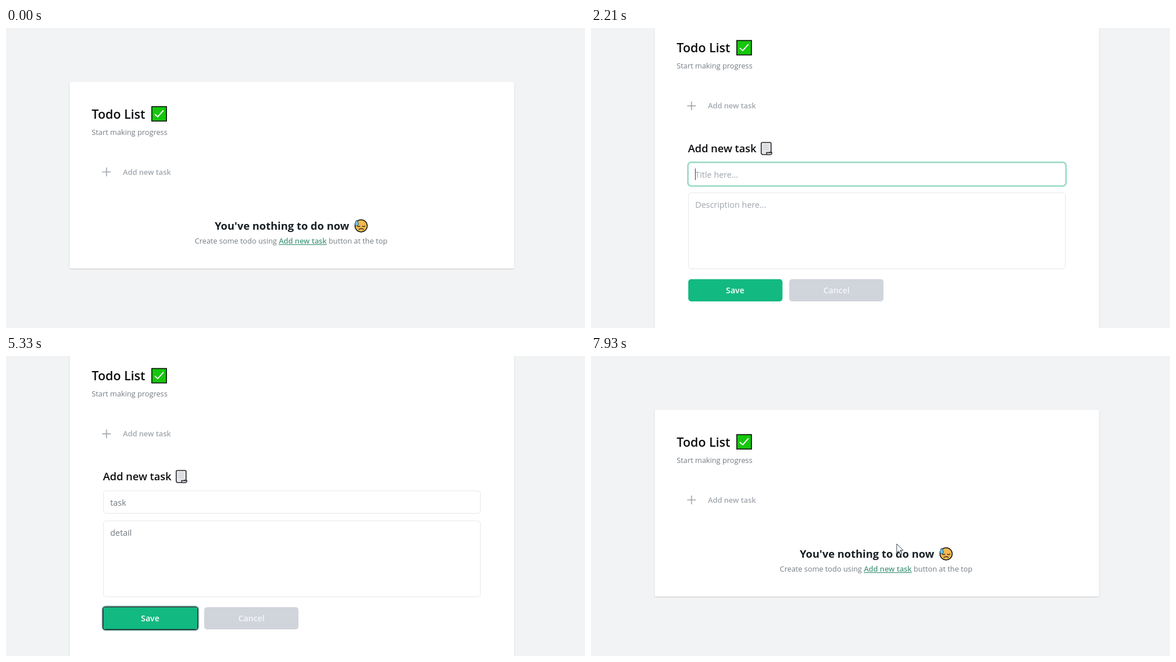
These frames come from a looping animation (1000x519 px, 8 s). An HTML page:

```html
<!DOCTYPE html>
<html lang="en">
<head>
<meta charset="utf-8">
<title>Todo List</title>
<style>
  html, body { margin: 0; width: 100%; height: 100%; overflow: hidden; background: #f1f3f4; }
  svg { display: block; width: 100%; height: 100%; }
  text { font-family: "Open Sans", "Noto Sans", sans-serif; white-space: pre; }
  .title { font-size: 21.5px; font-weight: 600; fill: #0c0d0f; }
  .small { font-size: 12.8px; fill: #767d84; }
  .add { font-size: 12.8px; font-weight: 600; fill: #a0a6ad; }
  .sub { font-size: 18.3px; font-weight: 600; fill: #0c0d0f; }
  .empty { font-size: 18.4px; font-weight: 700; fill: #182024; }
  .link { font-weight: 600; fill: #4c9a80; text-decoration: underline; }
  .body { font-size: 14.4px; fill: #72787e; }
  .hint { fill: #a0a6ad; }
  .btn { font-size: 14.2px; font-weight: 600; fill: #fff; text-anchor: middle; }
  .field { fill: #fff; stroke: #e4e6ea; }
  .ring { fill: none; stroke: #9bdcc4; stroke-width: 2.6; }
  .line { fill: none; stroke-linecap: round; stroke-linejoin: round; }
</style>
</head>
<body>
<svg viewBox="0 0 1000 519" preserveAspectRatio="none">
  <defs>
    <filter id="shadow" x="-5%" y="-5%" width="110%" height="110%">
      <feDropShadow dx="0" dy="1" stdDeviation="1.3" flood-color="#000" flood-opacity=".17"/>
    </filter>
  </defs>

  <rect id="card" x="110" width="767.5" rx="2" fill="#fff" filter="url(#shadow)"/>

  <g id="head">
    <text class="title" x="148" y="156.5">Todo List</text>
    <rect x="251.8" y="136" width="25.4" height="25" fill="#16c60c" stroke="#0b120b" stroke-width="1.6"/>
    <path class="line" d="M257.5 149.5l4.5 4 9.5-10.5" stroke="#fff" stroke-width="1.9"/>
    <text class="small" x="148" y="184.7">Start making progress</text>
    <rect id="hover" x="148.5" y="228" width="690.5" height="42" rx="5" fill="#f0f2f4"/>
    <path class="line" d="M166.8 249h13.6M173.6 242.2v13.6" stroke="#a0a6ad" stroke-width="1.7"/>
    <text class="add" x="202" y="253.5">Add new task</text>
  </g>

  <g id="empty">
    <text class="empty" x="360.5" y="349">You've nothing to do now</text>
    <circle cx="613.3" cy="342.3" r="10.6" fill="#f2b950" stroke="#17191b" stroke-width="1.5"/>
    <path class="line" d="M606.8 342.5q2 2 4.3.4M615.6 342.9q2.3 1.6 4.3-.4M609.5 348.5q4-3 8 0" stroke="#2a2419" stroke-width="1.4"/>
    <path d="M605.4 332.2q5.4 7 2.3 9.5-2.6 1.5-4.6-.8-1.4-2.4 2.3-8.7z" fill="#6cc3ee" stroke="#22465a" stroke-width=".9"/>
    <text class="small" x="326" y="373">Create some todo using <tspan class="link">Add new task</tspan> button at the top</text>
  </g>

  <g id="form">
    <text class="sub" x="167.5" y="215">Add new task</text>
    <path d="M296 198h13.5q1.5 0 1.5 2v15h-3v4h-11q-3 0-3-3v-16q0-2 2-2z" fill="#e6e7e9" stroke="#26282b" stroke-width="1.6" stroke-linejoin="round"/>
    <path d="M303 215.5h9.5q0 3.8-3.2 3.8h-5q-1.3-1-1.3-3.8z" fill="#c9ccd0" stroke="#26282b" stroke-width="1.3"/>
    <path d="M297.5 203h9.5M297.5 206.5h9.5M297.5 210h9.5" stroke="#c2c5c9"/>
    <rect class="field" x="168.3" y="233.3" width="651" height="39" rx="5"/>
    <rect id="ringTitle" class="ring" x="167.3" y="232.2" width="653.2" height="41.3" rx="6"/>
    <text id="title" class="body" x="180" y="258.6"></text>
    <rect class="field" x="168.3" y="285" width="651" height="131.6" rx="5"/>
    <rect id="ringDetail" class="ring" x="167.3" y="283.8" width="653.2" height="133.8" rx="6"/>
    <text id="detail" class="body" x="180" y="310.6"></text>
    <path id="caret" d="M0 0v20" stroke="#4b5056" stroke-width="1.2"/>
    <rect x="168" y="434.5" width="162.7" height="38.5" rx="5" fill="#12b981"/>
    <g id="ringSave" fill="none">
      <rect x="165.8" y="432.3" width="167.2" height="42.8" rx="6" stroke="#b9dde0" stroke-width="2"/>
      <rect x="167.4" y="434" width="163.9" height="39.4" rx="4.5" stroke="#14241f" stroke-width="1.7"/>
    </g>
    <text class="btn" x="249" y="459">Save</text>
    <rect x="342.3" y="434.5" width="162.9" height="38.5" rx="5" fill="#d0d4db"/>
    <text class="btn" x="424" y="459" style="fill:#f5f6f8">Cancel</text>
  </g>

  <g id="list">
    <text class="body" x="148.5" y="328.6">1.</text>
    <text class="body" x="168" y="328.6">task</text>
    <path class="line" d="M789 321.8l3.6 3.5 7.6-7.6" stroke="#36b493" stroke-width="2.5"/>
    <g class="line" stroke="#cf5144" stroke-width="1.7">
      <path d="M822.8 317h12.6M826.3 316.5v-2.7h5.6v2.7M824.2 317.5l.6 10.6h8.6l.6-10.6"/>
      <path d="M827.5 320.5v4.5M830.7 320.5v4.5" stroke-width="1.5"/>
    </g>
  </g>

  <path id="arrow" d="M0 0v15.5l3.6-3.4 2.6 5.8 2.6-1.2-2.6-5.5h4.9z" fill="#fff" stroke="#3a4148" stroke-linejoin="round"/>
  <path id="hand" d="M-1.7 1.5Q0-1 1.6 1.5V7q1.5-1.1 2.9.3 1.6-.9 2.8.6 2.2-.7 2.7 1.5v4.4q-.4 3.4-2.2 5.4v1.7H-.2v-1.6Q-3 16-5.2 12.5q-.7-2.4 1.2-2.3l2.3 2z" fill="#fff" stroke="#3a4148" stroke-linejoin="round"/>
</svg>
<script>
const LOOP = 8000, STEP = 130;
const OPEN = 1300, SAVED = 5720, REMOVED = 7540;
const ui = Object.fromEntries([...document.querySelectorAll('[id]')].map(el => [el.id, el]));

// Tracks are [time, value...] rows in order of time.
const hover = [[390, 0], [780, 1], [1300, 1], [1560, 0]];
const formFade = [[1300, .05], [1560, 1], [5330, 1], [5720, 0]];
const listFade = [[5720, .15], [5980, 1]];
const pointer = [[6240, 560, 500], [6500, 752, 396], [6760, 818, 329], [7020, 826, 318],
                 [7150, 827, 317], [7540, 827, 317], [7670, 827, 317], [7800, 690, 320], [7930, 528, 325]];
const focus = [[0, ''], [2210, 'title'], [2990, 'detail'], [5200, 'save']];
const titleText = [[0, ''], [2470, 't'], [2600, 'ta'], [2730, 'tas'], [2860, 'task']];
const detailText = [[0, ''], [3510, 'd'], [3770, 'de'], [4160, 'deta'], [4290, 'detail']];

const held = (track, t) => track.filter(row => row[0] <= t).pop()[1];

function tween(track, t) {
  const next = track.findIndex(row => row[0] > t);
  if (next < 0) return track[track.length - 1].slice(1);
  if (next === 0) return track[0].slice(1);
  const a = track[next - 1], b = track[next], k = (t - a[0]) / (b[0] - a[0]);
  return a.slice(1).map((v, i) => v + (b[i + 1] - v) * k);
}

const show = (el, on) => el.setAttribute('visibility', on ? 'visible' : 'hidden');
const fade = (el, amount) => el.setAttribute('opacity', amount);
const move = (el, x, y) => el.setAttribute('transform', `translate(${x} ${y})`);

function fill(el, value, hint) {
  const text = value || hint;
  if (el.textContent !== text) el.textContent = text;
  el.classList.toggle('hint', !value);
}

function layout(t) {
  if (t >= OPEN && t < SAVED) return { view: 'form', top: -20, height: 560, shift: -114.4 };
  if (t >= SAVED && t < REMOVED) return { view: 'list', top: 108, height: 293.5, shift: 14.6 };
  return { view: 'empty', top: 93.3, height: 322.7, shift: 0 };
}

function draw(t) {
  const { view, top, height, shift } = layout(t);
  ui.card.setAttribute('y', top);
  ui.card.setAttribute('height', height);
  move(ui.head, 0, shift);
  for (const name of ['empty', 'form', 'list']) ui[name].style.display = view === name ? '' : 'none';
  fade(ui.hover, tween(hover, t)[0]);
  fade(ui.form, tween(formFade, t)[0]);
  fade(ui.list, tween(listFade, t)[0]);

  const active = held(focus, t), typed = { title: held(titleText, t), detail: held(detailText, t) };
  fill(ui.title, typed.title, 'Title here...');
  fill(ui.detail, typed.detail, 'Description here...');
  show(ui.ringTitle, active === 'title');
  show(ui.ringDetail, active === 'detail');
  show(ui.ringSave, active === 'save');
  const editing = active in typed;
  show(ui.caret, editing && t < 4940);
  if (editing && view === 'form') {
    const width = typed[active] ? ui[active].getComputedTextLength() : 0;
    move(ui.caret, 180.3 + width, active === 'title' ? 243 : 294.5);
  }

  const [x, y] = tween(pointer, t);
  const onButton = t >= 6760 && t < REMOVED;
  show(ui.hand, onButton);
  show(ui.arrow, t >= 6240 && !onButton);
  move(ui.hand, x, y);
  move(ui.arrow, x, y);
}

const start = performance.now();
function tick() {
  const t = (performance.now() - start) % LOOP;
  draw(Math.floor(t / STEP) * STEP);
  requestAnimationFrame(tick);
}
tick();
</script>
</body>
</html>
```
